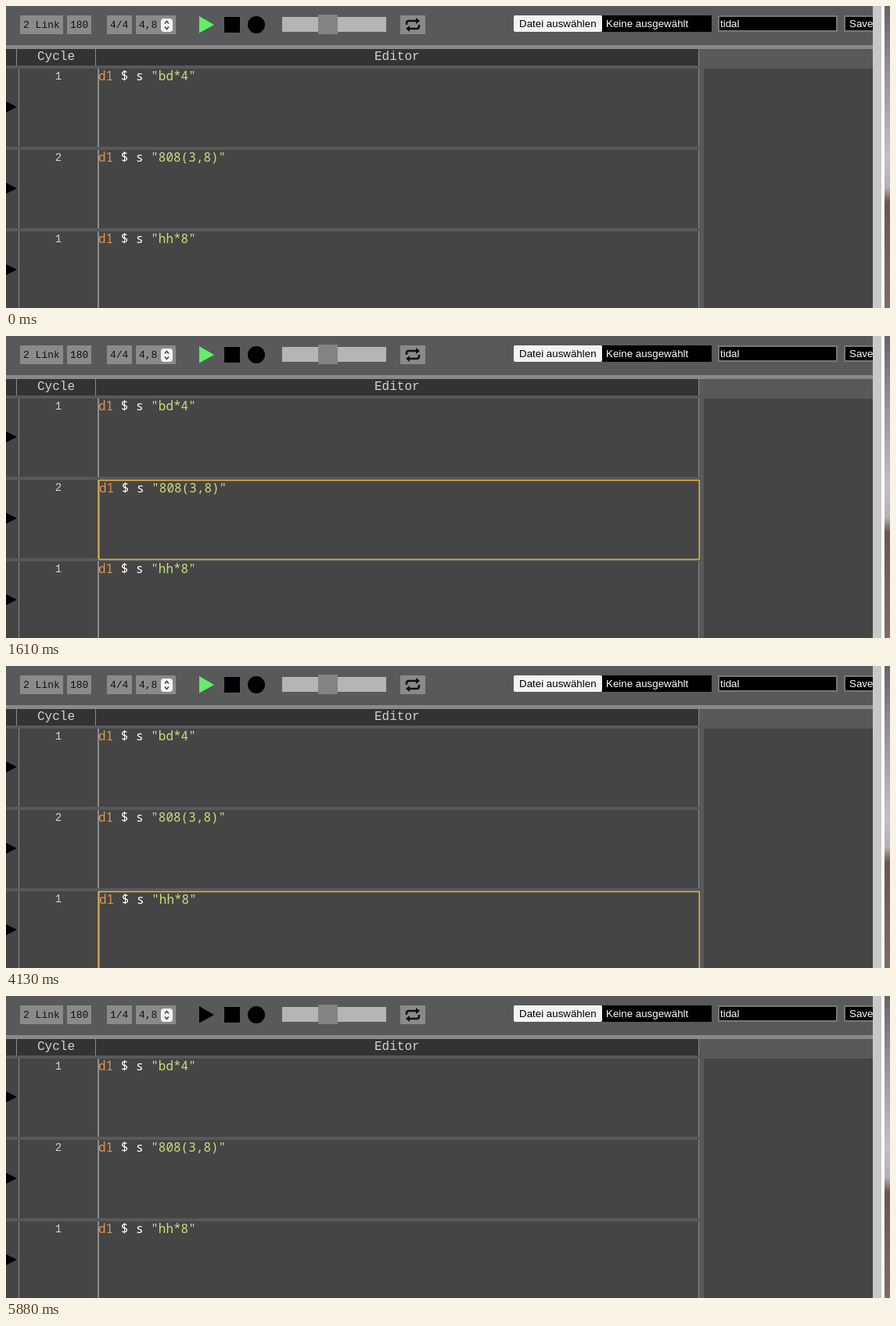
An HTML page for the animation above (6020 ms loop, 1130 px wide and 386 px high).

```html
<!DOCTYPE html>
<html lang="de">
<head>
<meta charset="utf-8">
<title>Pattern sequencer</title>
<style>
  html, body { margin: 0; width: 100%; height: 100%; overflow: hidden; background: #454545; }
  svg { display: block; width: 1130px; height: 386px; }
  text { white-space: pre; }
  .mono { font: 13px "Liberation Mono", monospace; fill: #111; }
  .head { font: 16px "Liberation Mono", monospace; fill: #d2d2da; }
  .count { font: 14px "Liberation Mono", monospace; fill: #d2d2da; text-anchor: middle; }
  .code { font: 16px "Noto Sans Mono", "DejaVu Sans Mono", monospace; fill: #fff; }
  .ui { font: 13.33px "Liberation Sans", Arial, sans-serif; fill: #fff; }
  .name { fill: #df9650; }
  .str { fill: #cbdc7c; }
  .btn { fill: #8a8a8a; }
  .line { fill: #8c8c8c; }
  .gap { fill: #58595b; }
</style>
</head>
<body>
<svg viewBox="0 0 1130 386">
  <defs>
    <linearGradient id="photo" x1="0" y1="0" x2="0" y2="1">
      <stop offset="0" stop-color="#626465"/>
      <stop offset=".2" stop-color="#8f8f92"/>
      <stop offset=".5" stop-color="#bfc0c6"/>
      <stop offset=".6" stop-color="#b3b0b3"/>
      <stop offset=".65" stop-color="#6b5551"/>
      <stop offset="1" stop-color="#7d6c69"/>
    </linearGradient>
  </defs>
  <rect width="1130" height="386" fill="#454545"/>

  <!-- toolbar -->
  <rect class="gap" width="1108" height="80"/>
  <rect y="50" width="1108" height="5" fill="#8b8986"/>
  <g class="btn">
    <rect x="18" y="12" width="55" height="24"/>
    <rect x="78" y="12" width="31" height="24"/>
    <rect x="129" y="12" width="32" height="24"/>
    <rect x="166" y="12" width="51" height="24"/>
    <rect x="504" y="12" width="32" height="24"/>
  </g>
  <g class="mono">
    <text x="22" y="28">2 Link</text>
    <text x="82" y="28">180</text>
    <text x="133" y="28" id="beat">4/4</text>
    <text x="170" y="28">4,8</text>
  </g>
  <rect x="198" y="16" width="15" height="17" rx="4" fill="#f4f4f4"/>
  <path d="M203 22.5l2.5-3 2.5 3M203 26.5l2.5 3 2.5-3" fill="none" stroke="#444" stroke-width="1.5"/>
  <path id="play" d="M247 13L266 24L247 34.500Z"/>
  <rect x="279" y="14" width="20" height="20"/>
  <circle cx="320" cy="24" r="11"/>
  <rect x="353" y="14" width="133" height="19" fill="#b5b5b5"/>
  <rect x="399" y="11" width="25" height="25" fill="#838383"/>
  <g fill="none" stroke="#111" stroke-width="2.5">
    <path d="M512 24v-2q0-3 3-3h10M528 24v2q0 3-3 3h-10"/>
    <path d="M524 15l5 4-5 4zM516 25l-5 4 5 4z" fill="#111" stroke="none"/>
  </g>
  <rect x="649" y="12" width="113" height="21" rx="2" fill="#f3f3f3"/>
  <rect x="762" y="12" width="140" height="21"/>
  <rect x="911" y="13" width="151" height="19" stroke="#777" stroke-width="2"/>
  <rect x="1072" y="13" width="60" height="19" stroke="#777" stroke-width="2"/>
  <g class="ui">
    <text x="656" y="27" style="fill:#000">Datei auswählen</text>
    <text x="767" y="27">Keine ausgewählt</text>
    <text x="913" y="27">tidal</text>
    <text x="1078" y="27">Save</text>
  </g>

  <!-- table head -->
  <rect y="55" width="885" height="21" fill="#333"/>
  <g class="line">
    <rect x="13" y="55" width="1" height="21"/>
    <rect x="114" y="55" width="1" height="21"/>
    <rect x="885" y="55" width="1" height="21"/>
  </g>
  <text class="head" x="40" y="69">Cycle</text>
  <text class="head" x="471" y="69">Editor</text>

  <g id="rows"></g>
  <rect class="gap" x="886" y="80" width="6" height="306"/>
  <g id="frames"></g>

  <!-- window edge -->
  <rect x="1108" width="11" height="386" fill="#cac7c7"/>
  <rect x="1119" width="4" height="386" fill="#fff"/>
  <rect x="1123" width="7" height="386" fill="url(#photo)"/>
</svg>
<script>
const LOOP = 6020, STOP = 5390, FLASH = 350;
const BASE = 69, PEAK = 107;

// times at which the beat counter moves on; the first one shows 1/4
const beats = [420, 770, 1050, 1400, 1750, 2100, 2380, 2730, 3080,
  3430, 3710, 4130, 4410, 4760, 5040, 5390, 5740];

const rows = [
  { cycles: 1, pattern: '"bd*4"', from: 70, to: 1400, flash: 420 },
  { cycles: 2, pattern: '"808(3,8)"', from: 1400, to: 4130, flash: 1750 },
  { cycles: 1, pattern: '"hh*8"', from: 4130, to: STOP, flash: 4410 }
];

const $ = id => document.getElementById(id);

function add(parent, tag, attrs, content = '') {
  const el = document.createElementNS('http://www.w3.org/2000/svg', tag);
  for (const key in attrs) el.setAttribute(key, attrs[key]);
  el.innerHTML = content;
  return parent.appendChild(el);
}

rows.forEach((row, i) => {
  const y = 80 + i * 104, g = $('rows');
  add(g, 'path', { d: `M0 ${y + 42}l14 7-14 7z` });
  for (const [x, w] of [[16, 1], [117, 2], [885, 1]])
    add(g, 'rect', { class: 'line', x, y, width: w, height: 100 });
  add(g, 'rect', { class: 'gap', x: 0, y: y + 100, width: 886, height: 4 });
  add(g, 'text', { class: 'count', x: 67, y: y + 14 }, row.cycles);

  row.frame = add($('frames'), 'rect', { x: 118.75, y: y + .5, width: 767.5, height: 101,
    stroke: '#dfb244', 'stroke-width': 1.5 });
  row.code = add($('frames'), 'text', { class: 'code', x: 118, y: y + 15 },
    `<tspan class="name">d1</tspan> $ s <tspan class="str">${row.pattern}</tspan>`);
});

// CSS "ease" timing curve, solved by bisection
function ease(x) {
  const bez = (a, b, u) => 3 * a * u * (1 - u) ** 2 + 3 * b * u * u * (1 - u) + u ** 3;
  let lo = 0, hi = 1;
  for (let i = 0; i < 20; i++) {
    const mid = (lo + hi) / 2;
    if (bez(.25, .25, mid) < x) lo = mid; else hi = mid;
  }
  return bez(.1, 1, lo);
}

function glow(age) {
  const p = age / FLASH * 2;
  if (p <= 0 || p >= 2) return 0;
  return p < 1 ? ease(p) : 1 - ease(p - 1);
}

function draw(t) {
  const n = beats.filter(b => b <= t).length;
  $('beat').textContent = `${(n + 3) % 4 + 1}/4`;
  $('play').setAttribute('fill', t < STOP ? '#62ef66' : '#000');
  for (const row of rows) {
    const on = t >= row.from && t < row.to;
    const v = Math.round(BASE + (PEAK - BASE) * glow(t - row.flash));
    row.frame.style.display = on ? '' : 'none';
    row.frame.setAttribute('fill', `rgb(${v},${v},${v})`);
    row.code.setAttribute('transform', on ? 'translate(1 1)' : '');
  }
}

const start = performance.now();
function tick() {
  draw((performance.now() - start) % LOOP);
  requestAnimationFrame(tick);
}
tick();
</script>
</body>
</html>
```
